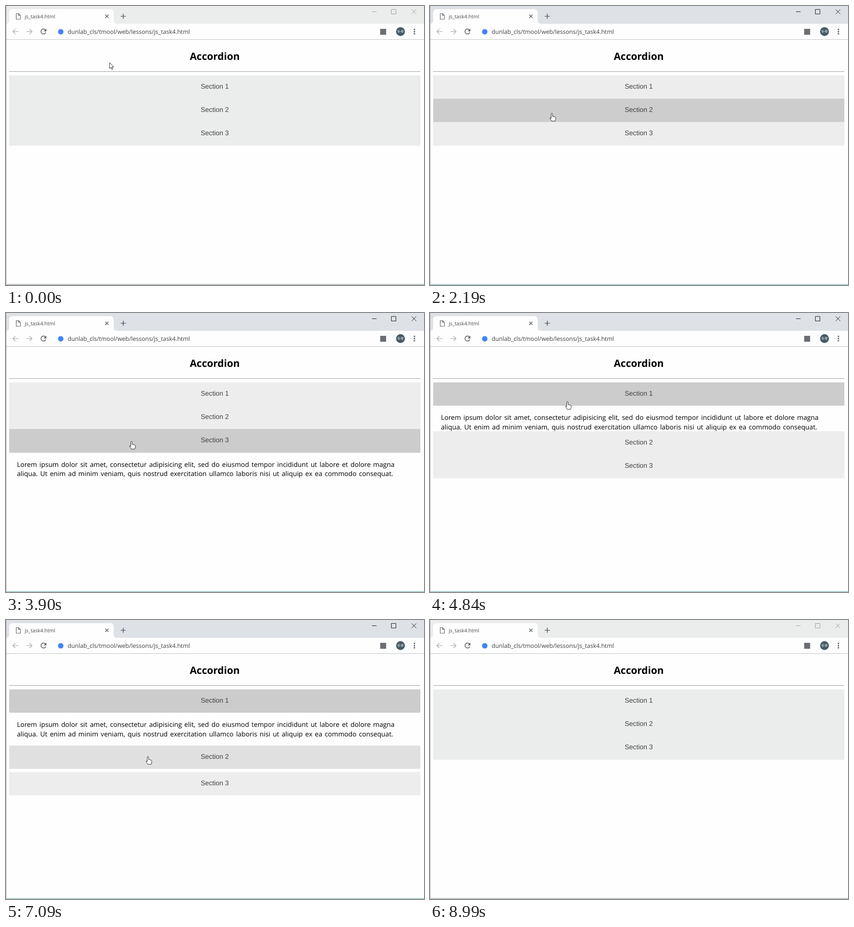
Write an HTML page that moves like this. It is 916 px wide and 611 px high and loops after 9.14 s.

```html
<!DOCTYPE html>
<html lang="en">
<head>
<meta charset="utf-8">
<title>Accordion</title>
<style>
  html, body { margin: 0; width: 100%; height: 100%; overflow: hidden; background: #fefefe; }
  body { position: relative; text-rendering: geometricPrecision; }
  #list { position: absolute; left: 7px; top: 152px; width: 901px; }
  .bar { height: 51.2px; line-height: 51.2px; text-align: center; color: #444;
         font-family: "Liberation Sans", Arial, sans-serif; font-size: 14.8px; }
  .panel { overflow: hidden; }
  .panel p { margin: 0; padding: 16px 17px; white-space: nowrap; color: #000;
             font: 14.6px/20.8px "Open Sans", sans-serif; word-spacing: 1.7px; }
  svg { position: absolute; left: 0; top: 0; }
  svg text { font-family: "Open Sans", sans-serif; }
  .line { fill: none; stroke: #5f6368; stroke-width: 1.7; }
  .dim { stroke: #b4b7ba; }
</style>
</head>
<body>
<div id="list"></div>
<svg width="916" height="611" viewBox="0 0 916 611">
  <rect id="strip" width="916" height="39"/>
  <path fill="#fefefe" d="M0 39q7 0 7-7V15q0-8 8-8H228q8 0 8 8V32q0 7 7 7H916V73H0z"/>
  <path class="line" style="stroke-width:1.2" d="M22.5 16.5h5l4 4v8.5h-9zM27.5 16.5v4h4"/>
  <text x="41" y="27" font-size="11" fill="#45494d">js_task4.html</text>
  <path class="line" d="M217.5 19l7 7m0-7l-7 7M251.5 22.5h11M257 17v11"/>
  <path class="line dim" d="M27 56H15m5.5-5.5L15 56l5.5 5.5M45 56h12m-5.5-5.5L57 56l-5.5 5.5"/>
  <path class="line" d="M86.5 52.5A5.5 5.5 0 1 0 87.3 58"/>
  <path fill="#5f6368" d="M88.5 49.5v6h-6z"/>
  <circle cx="120" cy="56.5" r="6" fill="#4285f4"/>
  <text x="135" y="61" font-size="13" fill="#3c4043">dunlab_cls/tmool/web/lessons/js_task4.html</text>
  <rect x="820" y="50" width="13" height="13" fill="#6b6f73"/>
  <circle cx="864.5" cy="56" r="9.7" fill="#455a64"/>
  <text x="864.5" y="59" font-size="8" fill="#fff" text-anchor="middle"
        style="font-family:'Noto Sans CJK KR','Noto Sans CJK',sans-serif">두루</text>
  <path stroke="#5f6368" stroke-width="3.4" stroke-linecap="round" stroke-dasharray="0 4.8" d="M895 51.2v9.7"/>
  <path id="buttons" fill="none" d="M802 12.5h10M844.5 7.5h10v10h-10zM889 7.5l10 10m0-10l-10 10"/>
  <rect y="73" width="916" height="1" fill="#bfc1c2"/>
  <text x="457.5" y="118" font-size="22" font-weight="700" text-anchor="middle">Accordion</text>
  <rect x="7" y="143" width="901" height="1" fill="#9a9a9a"/>
  <rect width="1" height="611" fill="#adadad"/>
  <rect id="edge" y="609" width="916" height="1"/>
  <rect y="610" width="916" height="1" fill="#c4d6d5"/>
  <path id="cursor" fill="#fff" stroke="#222" stroke-linejoin="round"/>
</svg>
<script>
const LOOP = 9140, TOP = 152, BAR = 51.2, PANEL = 71.7;
const ARROW = 'M0 0v13l3-2.6 2 4.4 2-.9-2-4.3h4z';
const HAND = 'M-1.5 1.5a1.5 1.5 0 0 1 3 0v5l5 1.2q2 .6 2 2.5v2.5l-1.5 4.3h-7l-4-5.5q-.8-1.6.8-1.8l1.7 1.5z';

// Two visits per section: pointer enters, click opens, click closes
const SECTIONS = [
  [[390, 1150, 1740], [4450, 4723, 7650]],
  [[1850, 2230, 3080], [4920, 5330, 6940]],
  [[3170, 3700, 4290], [5790, 6080, 6400]]
];

// Pointer moves: start, end, x, y
const START = [227, 124];
const MOVES = [
  [390, 700, 261, 181], [1760, 2190, 267, 235], [3100, 3500, 275, 281],
  [4300, 4840, 301, 194], [4840, 5230, 295, 297], [5520, 5890, 292, 415],
  [6420, 6820, 311, 299], [7090, 7650, 355, 189], [7750, 8400, 400, 620]
];

const TEXT = 'Lorem ipsum dolor sit amet, consectetur adipisicing elit, sed do eiusmod tempor incididunt ut labore et dolore magna<br>' +
  'aliqua. Ut enim ad minim veniam, quis nostrud exercitation ullamco laboris nisi ut aliquip ex ea commodo consequat.';

const $ = id => document.getElementById(id);
$('list').innerHTML = SECTIONS.map((s, i) =>
  `<div class="bar">Section ${i + 1}</div><div class="panel"><p>${TEXT}</p></div>`).join('');
const bars = document.querySelectorAll('.bar'), panels = document.querySelectorAll('.panel');

const progress = (t, start, end) => Math.max(0, Math.min(1, (t - start) / (end - start)));
const easeOut = (t, start, duration, power) => 1 - (1 - progress(t, start, start + duration)) ** power;
const pulse = (t, on, off, duration, power) =>
  easeOut(t, on, duration, power) - easeOut(t, off, duration, power);

function pointer(t) {
  let [x, y] = START;
  for (const [start, end, toX, toY] of MOVES) {
    const u = progress(t, start, end), k = u * u * (3 - 2 * u);
    x += (toX - x) * k;
    y += (toY - y) * k;
  }
  return [Math.round(x), Math.round(y)];
}

function draw(t) {
  const focused = t >= 1070 && t < 8990;
  $('strip').setAttribute('fill', focused ? '#dee1e6' : '#ebedec');
  $('edge').setAttribute('fill', focused ? '#8cc8c4' : '#a8a8a8');
  $('buttons').setAttribute('stroke', focused ? '#111' : '#999');

  const [x, y] = pointer(t);
  let top = TOP, overBar = false;
  SECTIONS.forEach((visits, i) => {
    let shade = 0, open = 0;
    for (const [enter, click, close] of visits) {
      shade += pulse(t, enter, close, 400, 2);
      open += pulse(t, click, close, 200, 1.7);
    }
    const gray = 237 - 33 * shade, tint = focused ? 0 : 2 * (1 - shade);
    bars[i].style.background = `rgb(${gray - tint},${gray},${gray})`;
    panels[i].style.height = PANEL * open + 'px';
    overBar ||= y >= top && y < top + BAR;
    top += BAR + PANEL * open;
  });

  $('cursor').setAttribute('d', overBar ? HAND : ARROW);
  $('cursor').setAttribute('transform', `translate(${x} ${y})`);
}

function frame() {
  draw(performance.now() % LOOP);
  requestAnimationFrame(frame);
}
frame();
</script>
</body>
</html>
```
